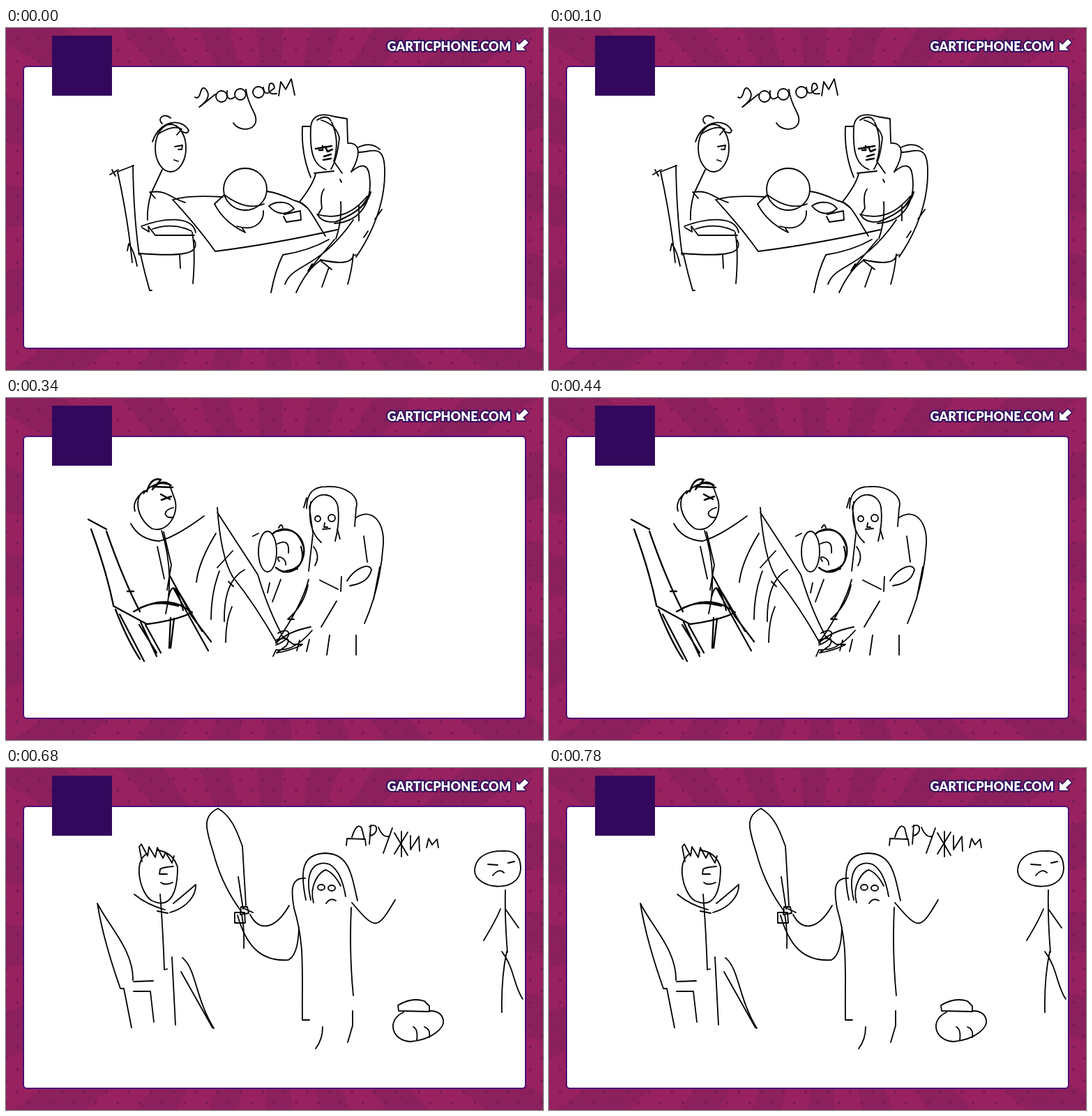
An HTML page for the animation above (850 ms loop, 770 by 490 pixels).

```html
<!DOCTYPE html>
<html lang="ru">
<head>
<meta charset="utf-8">
<title>Sketch loop</title>
<style>
  html, body { margin: 0; width: 100%; height: 100%; overflow: hidden; }
  body {
    background:
      radial-gradient(circle, #7b1a5a 1.6px, transparent 2.4px) 0 0 / 32px 32px,
      radial-gradient(circle, #7b1a5a 1.6px, transparent 2.4px) 16px 16px / 32px 32px,
      repeating-conic-gradient(from 3deg at 385px 245px, #98215f 0 9deg, #8b205d 9deg 18deg);
  }
  svg { display: block; }
  .url {
    font: 900 18px Lato, sans-serif;
    fill: #fff; stroke: #30105f; stroke-width: 4; stroke-linejoin: round;
    paint-order: stroke; text-anchor: end;
  }
  .scene {
    fill: none; stroke: #000; stroke-width: 1.8;
    stroke-linecap: round; stroke-linejoin: round;
    visibility: hidden;
    animation: show 850ms step-end infinite;
    animation-delay: calc(var(--i) * 170ms - 850ms);
  }
  @keyframes show {
    0% { visibility: visible; }
    20%, 100% { visibility: hidden; }
  }
</style>
</head>
<body>
<svg width="770" height="490" viewBox="0 0 770 490">
  <rect x="25" y="55" width="720" height="404" rx="5" fill="#fff" stroke="#4b0f78" stroke-width="2"/>
  <rect x="66" y="11" width="86" height="86" fill="#32085c"/>
  <text class="url" x="724" y="33">GARTICPHONE.COM</text>
  <path d="M732 20V32H745L741 28L749 21L744 16L736 24Z" fill="#fff" stroke="#30105f"
    stroke-width="3" stroke-linejoin="round" paint-order="stroke"/>

  <g class="scene" style="--i:0">
    <!-- lettering -->
    <path d="M271 99Q276 103 279 92T288 90T281 110T300 95"/>
    <circle cx="309" cy="98" r="8"/>
    <path d="M317 90Q316 107 328 99"/>
    <circle cx="336" cy="95" r="8"/>
    <path d="M344 88Q346 103 355 120C369 146 336 152 326 136"/>
    <circle cx="362" cy="92" r="8"/>
    <path d="M369 85Q370 95 376 93L385 86Q384 77 378 80Q373 97 388 94M391 97L394 77L401 88L409 73L414 96"/>
    <!-- guest -->
    <ellipse cx="236" cy="172" rx="22" ry="34"/>
    <path d="M224 137C215 129 228 121 236 129M210 163C220 132 252 128 262 147Q260 153 252 148M218 152Q240 138 252 145L245 153"/>
    <path d="M242 170L253 168L252 174H247M241 189L247 191M224 203L208 237Q202 258 203 275M206 235L214 244M208 235C230 232 235 243 257 250"/>
    <!-- chair -->
    <path d="M149 210L161 203M152 203L157 212M160 206L183 197M160 206Q175 274 181 336M182 197Q183 270 191 325M174 319L176 309Q184 320 188 341"/>
    <path d="M194 284C225 272 267 268 272 293M195 286L205 292L204 284L214 297H270M210 288Q240 278 266 291M190 323C245 327 280 326 270 304M193 325Q199 352 206 376H209M249 324L250 344M267 293Q272 320 268 366"/>
    <!-- table -->
    <path d="M240 246Q260 239 311 242M239 246Q275 285 300 320Q380 310 475 289M374 234Q390 236 413 247C434 252 435 262 458 298"/>
    <ellipse cx="343" cy="231" rx="31" ry="30"/>
    <path d="M313 239L299 252Q312 278 343 293L339 287M331 284C360 293 370 274 369 262M313 239Q345 263 370 252M377 255C388 247 406 248 413 259C400 270 386 266 377 255M399 267L422 262L423 275L402 278L398 270"/>
    <!-- host -->
    <path d="M437 141H425Q423 180 437 214M437 141C440 118 464 125 471 127L489 130L490 163M446 132Q460 123 466 133M452 132Q473 138 478 157Q475 188 466 202"/>
    <path d="M437 141C435 183 443 197 459 203M467 135Q479 161 470 191L482 208M490 165C510 164 508 184 495 206M442 208L470 205"/>
    <path stroke-width="2.5" d="M444 173L467 169M449 175H454V169M458 170L461 177L468 174M456 184L466 181M455 189L466 187"/>
    <path d="M444 209Q440 225 421 249L431 257M456 231Q450 238 453 258L447 268C455 281 474 280 485 272C508 262 516 249 523 235M446 267Q487 279 518 241"/>
    <path d="M495 206Q518 187 521 211C526 246 511 277 471 280M523 235Q518 259 474 277M479 217L481 221M480 249Q482 276 473 302M506 254V276"/>
    <path d="M506 178C525 178 543 164 543 205C544 250 525 295 502 328M505 171Q523 162 536 174M539 260L529 274M519 291L513 300"/>
    <path d="M380 379Q386 347 397 325Q435 319 463 303M400 367C411 337 448 347 498 275M471 303L433 348L439 338M451 333Q432 345 416 379M451 332Q495 342 498 326L502 325M463 343L453 371M452 334L467 346M498 324Q496 347 490 367"/>
  </g>

  <g class="scene" style="--i:1">
    <!-- guest -->
    <path d="M227 143L226 127L238 126L241 129M231 142Q234 134 242 137M203 169L208 154M218 154C216 165 212 188 217 199C219 208 244 209 256 189Q262 172 257 154"/>
    <path stroke-width="2.6" d="M217 156Q232 142 259 147M218 153Q240 146 257 155M246 143L260 150L249 148L259 156L253 160"/>
    <path d="M239 170L252 167L251 174H247M243 186L253 192M219 203L226 208M221 212C200 228 187 268 210 292M211 232Q235 234 249 247L257 250"/>
    <!-- chair -->
    <path d="M154 205Q165 205 183 193M154 205L159 211M160 207Q172 251 181 319L186 345H189M181 196Q176 230 188 318"/>
    <path d="M190 284Q210 275 255 276L256 289M203 293Q221 284 266 296M218 297L270 301M191 319Q210 329 270 317M196 322Q197 350 205 372H208M248 323L251 345M251 278C254 306 272 298 270 335L269 363"/>
    <!-- table -->
    <path d="M214 236L215 242M238 253C283 282 291 287 300 322Q345 302 402 300L463 290M256 249Q280 243 308 239M375 235Q421 241 435 256T460 289"/>
    <path d="M311 226C315 193 351 193 364 207C383 232 371 260 359 261C330 259 303 249 311 226M308 245C292 253 312 266 320 276C343 300 367 291 363 262M310 245Q331 245 363 259"/>
    <path stroke-width="2.5" d="M341 215H331V232Q334 236 341 235M355 215C339 213 336 237 356 236"/>
    <!-- host -->
    <path d="M436 149L424 139L439 137C448 123 483 121 497 158M427 142Q428 190 435 215L431 246M442 130C433 150 437 179 449 199Q459 204 466 197"/>
    <path d="M455 137Q473 130 478 157L474 170L475 186L470 200M474 136Q489 145 489 158M445 207H464M498 162Q483 187 476 202"/>
    <path stroke-width="2.3" d="M443 172H467M447 176H454M457 168V177L467 174L457 171L466 168M453 187L463 183L458 190L465 188L460 195"/>
    <path d="M446 210Q444 235 442 255M450 230L449 266L477 272M449 263L475 269M478 250V282M492 202C513 189 488 174 506 175L521 179M504 178Q505 170 513 167C556 164 546 204 538 226Q523 281 504 324L500 340M501 199Q524 206 525 248"/>
    <path d="M527 244Q486 258 483 275M528 251Q505 258 484 276M499 257L513 246M459 296C440 319 412 325 397 326M395 334L383 371M475 297L451 333M435 336Q422 341 410 360M439 336L431 363"/>
    <path d="M450 332Q470 342 494 336M451 331L469 340Q470 355 455 365L454 374M501 339L497 367"/>
  </g>

  <g class="scene" style="--i:2">
    <!-- guest -->
    <path d="M197 137Q214 116 237 125M202 132C181 138 187 173 209 187C230 195 249 167 242 145L235 126M185 162Q180 148 198 133"/>
    <path stroke-width="2.5" d="M202 134Q208 113 222 117L210 131Q221 115 235 124M209 127L239 128M222 138L235 145M223 146L237 141"/>
    <path d="M240 157C222 162 228 173 239 171M179 180Q191 203 220 205Q245 198 284 169M223 190Q242 250 229 309M226 192L237 239L231 275M217 213L227 259"/>
    <!-- chair -->
    <path stroke-width="2.3" d="M118 174L144 188M122 188Q144 248 154 297M144 191Q168 260 192 306M174 277H183M154 298L202 324Q247 318 267 307M183 306Q231 278 266 307M187 304Q211 288 247 298"/>
    <path stroke-width="2.3" d="M157 303Q174 347 192 374M163 310L198 377M193 321L216 370M200 325L222 365M191 325L216 365M236 315L234 358M241 316L236 358"/>
    <path stroke-width="2.2" d="M233 285C239 261 246 273 254 304M235 255L266 312L294 349M241 274L290 362M249 280L281 334"/>
    <!-- swing -->
    <path d="M303 157Q308 228 325 256Q358 297 389 352M303 164L361 253Q376 303 395 338M301 194Q276 235 273 264M325 219L303 243M306 248Q294 279 294 317M342 246Q312 262 313 320M319 263L326 270M324 299Q315 319 315 350"/>
    <ellipse cx="375" cy="220" rx="13" ry="29"/>
    <path stroke-width="2.3" d="M383 194C402 178 431 196 427 224C422 248 403 256 387 243M389 191Q417 182 426 212M423 213Q433 245 397 249"/>
    <path d="M404 247L418 245M391 186Q395 178 397 186M354 198L362 194M389 209Q407 200 405 222M392 234C383 223 403 228 401 239M378 265L375 279M394 260L382 292"/>
    <!-- host -->
    <path d="M427 157L431 143M431 158C431 133 444 127 459 127C488 125 507 141 502 158L500 184M435 156C444 131 472 135 476 156Q479 178 472 205M437 149Q431 188 452 207M435 157L440 193"/>
    <circle cx="447" cy="173" r="4"/>
    <circle cx="467" cy="172" r="5"/>
    <path d="M457 179L456 185H461M454 188L465 187M440 195L434 248M475 188L479 202M501 172C526 155 543 180 541 209Q537 270 514 323M536 242L527 289M513 198L518 235"/>
    <path d="M450 261L476 274M481 256L480 277M441 213Q451 226 443 240M489 262C500 244 521 235 524 246Q520 265 493 269M434 260Q424 298 387 351M433 268Q427 297 404 317H413M474 291L452 328"/>
    <path d="M437 328Q405 334 387 351M439 333C415 361 400 361 387 361L383 370M390 337C407 326 415 343 387 354M386 347Q412 339 402 355L388 365Q405 363 424 354M396 341L412 353H425M421 347L417 362"/>
    <path d="M435 346L431 363M464 340L460 368M502 340V368"/>
  </g>

  <g class="scene" style="--i:3">
    <!-- lettering -->
    <path d="M579 86L584 79L580 110M577 93C588 87 602 104 577 106M598 89V108Q612 101 598 96M615 91L612 109M650 87V97Q660 98 665 82L660 104M692 86L678 87L675 103L690 104M677 95H689"/>
    <path d="M571 127H587M580 127L579 145M593 125Q597 139 606 135M608 124L597 150M614 135H627M621 126L618 147M565 177L567 182M571 176L593 174L594 180M576 174L583 162H590L589 174"/>
    <path d="M598 170Q609 167 604 162Q591 177 607 174M611 177L614 163L624 164L626 178M639 164Q627 163 630 174Q640 178 642 163L644 176M655 164Q643 175 656 174M656 164L667 162M661 163L662 177M666 171Q678 169 672 162Q662 178 678 174M679 165Q686 156 689 166L685 178M685 188V190"/>
    <!-- guest -->
    <path stroke-width="2.2" d="M204 124L214 114L218 128L227 115L232 129L239 125M205 119L237 121M206 128L234 126L212 117L236 130"/>
    <path d="M207 127C186 131 189 182 213 191C239 193 246 154 232 130M190 135Q176 147 176 170M219 140L240 147M220 146L240 140M237 158C220 158 222 175 231 173L240 170"/>
    <path stroke-width="2.2" d="M184 183Q200 198 242 213M225 207Q247 193 284 168M242 194L278 174M229 178Q232 235 238 276M230 181Q230 243 232 304"/>
    <!-- chair -->
    <path d="M142 183L117 174Q129 192 133 221T157 310M144 190Q174 270 190 319M148 221L190 324M172 250L207 309M164 307L206 324L260 307M180 302Q214 285 241 302M180 317Q187 297 229 299L255 309"/>
    <path stroke-width="2.3" d="M153 299Q171 350 187 362M157 311L183 361M169 310L188 361M190 320L214 372M180 317L223 373M199 322L225 370M214 323V360L222 372M203 326L222 369"/>
    <path stroke-width="2.3" d="M235 282L231 355M239 280Q231 316 241 374M244 287L242 324L253 358M248 280Q261 319 257 357M244 282Q272 320 290 365L251 309M256 286Q284 319 287 341M251 309L250 353"/>
    <!-- swing -->
    <path d="M302 165C313 218 303 244 326 270Q368 313 390 350M302 165L363 253Q362 284 389 347M304 190Q275 223 275 275M328 218Q302 252 299 299M340 244Q308 291 309 345"/>
    <path d="M378 193C363 187 364 210 365 225Q366 245 380 248C386 237 395 201 378 193M383 198C402 175 426 189 425 218C420 246 399 250 380 247M389 208Q407 202 404 219M386 233C393 224 405 229 405 241"/>
    <!-- host -->
    <path d="M432 201C421 164 430 138 459 131C488 130 510 151 501 187M438 194C437 166 441 150 458 146C486 148 480 173 476 195"/>
    <circle cx="448" cy="172" r="4"/>
    <circle cx="468" cy="172" r="4.5"/>
    <path d="M458 171L457 180L453 184L460 182L465 186M439 191L442 207L437 228M439 207Q450 220 450 245M502 167C543 158 539 203 534 230Q533 295 518 341M513 200L514 236M538 237L537 249"/>
    <path d="M490 257C502 243 529 234 531 248C526 268 515 266 504 265M453 262L472 278M484 247L481 273M433 257C433 306 411 307 390 345M474 280Q474 310 449 330"/>
    <path d="M390 348C389 328 407 327 407 343H392L390 359Q401 368 410 353M411 352C413 332 430 331 452 321Q443 348 411 357V352M435 349L438 380M462 338L456 370M499 343V387"/>
    <!-- visitor -->
    <path d="M684 125Q703 121 728 121C745 126 739 139 739 151C733 176 688 176 682 153Q674 140 684 125M698 154L708 152L721 155M711 171Q721 230 710 275M712 193L692 236M713 193L735 237M710 274L717 350M712 275Q734 301 734 345"/>
    <path stroke-width="2.4" d="M694 138L704 137L703 141L695 140M719 138L727 135L725 141L719 138"/>
  </g>

  <g class="scene" style="--i:4">
    <!-- lettering -->
    <path d="M488 111L489 101L515 102L516 111M496 99Q503 77 510 86L514 102M521 109L523 82M521 84C535 76 534 96 522 97M534 85Q540 100 549 98M554 86L541 122M557 93L576 125M576 92L557 123M567 91V127M580 97V117L592 98L593 119M603 114L606 101L611 110L618 102L620 114"/>
    <!-- guest -->
    <path d="M195 134L191 113L194 109L203 126L205 113L214 128L217 114L225 129L229 121L238 136L241 126M204 122C180 132 193 181 209 190C238 204 246 174 246 142Q239 120 217 118"/>
    <path d="M240 141Q225 142 221 145L220 152H231M222 164Q228 169 239 164M184 181Q202 196 228 203M217 205L232 208M235 207C260 200 273 182 272 167Q256 181 240 194M221 181Q225 230 227 289L231 288M238 271L243 368M253 272C273 288 271 329 298 373M251 292L296 372"/>
    <!-- chair -->
    <path d="M131 194Q139 245 164 316M131 194C148 228 183 261 182 304M164 316H169L180 372M183 306L211 305M183 320H207L212 364"/>
    <!-- blade -->
    <path d="M304 58C276 71 291 97 300 131Q312 171 337 205M304 58C325 70 332 94 339 112Q342 160 344 197M333 156L340 202"/>
    <path d="M337 199H346L348 208L336 210ZM328 207H342L343 222H328ZM341 201L354 207M338 210Q342 231 341 258"/>
    <!-- host -->
    <path d="M430 189C421 146 425 123 458 122C492 123 495 151 504 190M437 189C426 142 447 132 464 138Q481 148 487 184M441 193C434 168 450 147 459 146Q471 151 480 169"/>
    <ellipse cx="452" cy="171" rx="5" ry="4"/>
    <ellipse cx="467" cy="172" rx="5" ry="4"/>
    <path d="M459 194Q465 185 473 190M429 158C407 157 409 178 413 201C429 254 424 290 425 361H435M350 210C363 235 386 232 406 197M332 211C344 254 365 278 405 275Q419 268 420 228"/>
    <path d="M495 200Q492 266 498 326M496 193C530 233 532 233 558 189M454 371Q454 389 444 402M497 348V369L490 393"/>
    <path d="M563 348L562 340Q582 328 600 334L607 341V349ZM570 350C545 361 553 391 580 392C612 389 629 372 627 361Q624 348 608 348M584 371Q591 374 589 390M600 371Q609 374 607 386"/>
    <!-- visitor -->
    <path d="M672 146C674 123 698 118 714 119C738 117 738 139 738 145C735 182 671 173 672 146M691 138L705 139M720 136L729 134M698 154Q707 143 714 150M716 175Q715 215 719 264M709 202Q702 219 685 247M716 202L735 229M718 263Q710 300 711 350M711 263C729 286 728 313 741 331"/>
  </g>
</svg>
</body>
</html>
```
